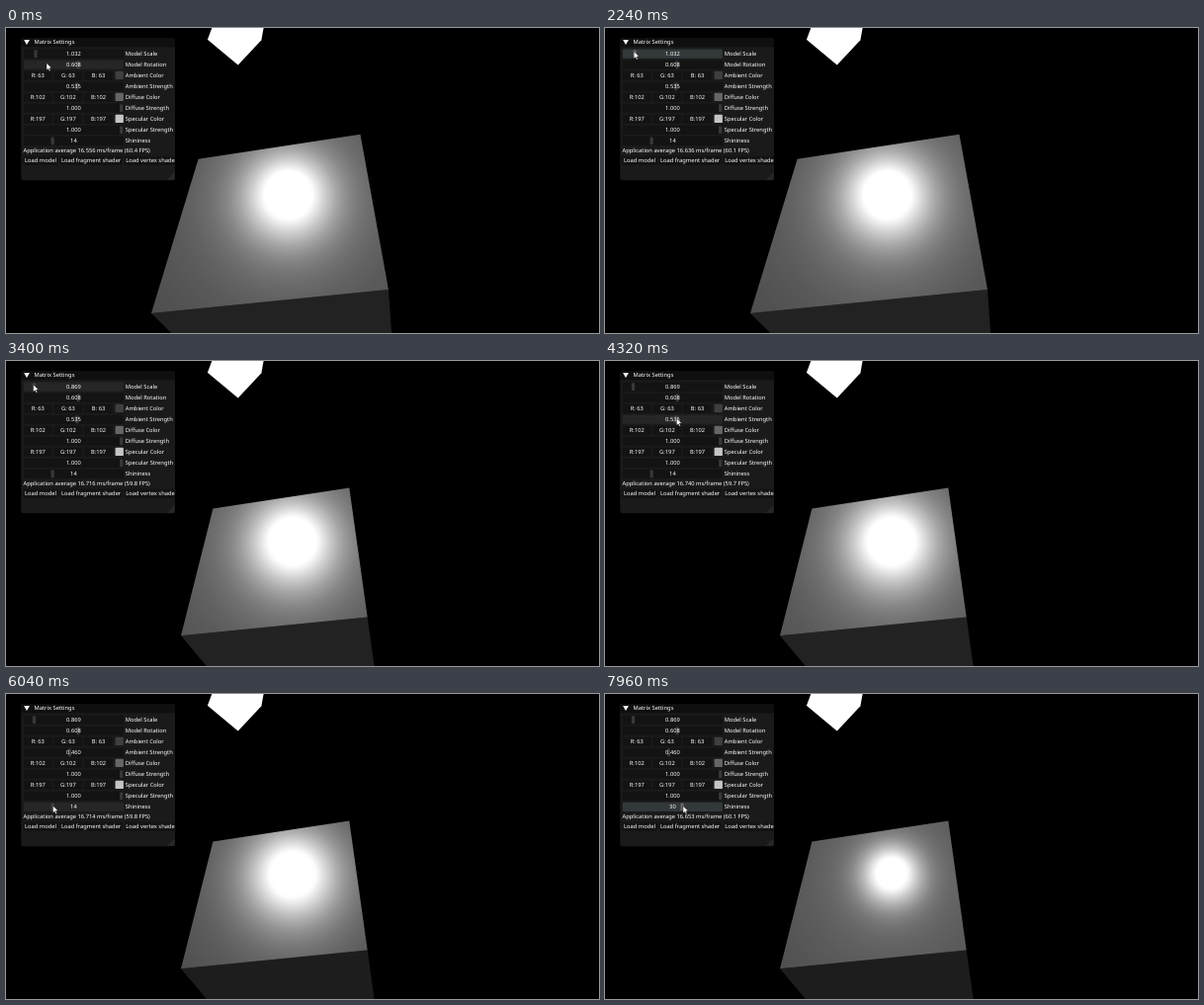
Recreate the animation shown at these times as an HTML page with a canvas. Size 600 by 309 pixels, loop 8 s.

```html
<!DOCTYPE html>
<html lang="en">
<head>
<meta charset="utf-8">
<title>Matrix Settings</title>
<style>
  html, body { margin: 0; width: 100%; height: 100%; overflow: hidden; background: #000; }
  canvas { display: block; width: 600px; height: 309px; }
</style>
</head>
<body>
<canvas id="stage" width="600" height="309"></canvas>
<script>
const ctx = document.getElementById('stage').getContext('2d');
const LOOP = 8000, STEP = 40;

const WHITE = '#fff';
const ROW_FILL = { idle: '#131313', hover: '#262626', active: '#33383b' };
const LEFT = 17.9, WIDTH = 101, ROW_TOP = 21.6, PITCH = 11.03, ROW_H = 9.1, GAP = 1.9;
const TRAVEL = 96.6;     // distance a slider grab can move
const UI_PIXEL = 0.3155; // one pixel of the panel, which is shown reduced

// Eased pointer moves: from, to, x, y
const HOME = [41, 35.5];
const MOVES = [
  [160, 760, 57, 55.5],
  [1040, 1640, 29.2, 23.8],
  [2260, 2820, 27.65, 24],
  [3480, 4200, 72.4, 58],
  [4600, 5200, 65, 58.5],
  [5560, 6060, 47.4, 113.5],
  [6760, 6900, 42, 113.5],
  [7000, 7760, 79, 113.5]
];

// Sliders follow the pointer while it is held down
const DRAGS = {
  scale: { row: 0, from: 1660, to: 3080, start: 1.032, range: 10 },
  ambient: { row: 3, from: 4480, to: 5500, start: 0.535, range: 1 },
  shininess: { row: 8, from: 6560, to: LOOP, start: 14, range: 50 }
};

const FRAME_MS = [[0, 16.556], [880, 16.703], [2240, 16.636], [3400, 16.716],
                  [5360, 16.767], [6920, 16.646], [7960, 16.6526]];

const mix = (a, b, u) => a + (b - a) * u;
const clamp01 = u => Math.min(1, Math.max(0, u));
const ease = u => u * u * (3 - 2 * u);
const gray = v => `rgb(${v},${v},${v})`;

function pointerAt(t) {
  return MOVES.reduce(([x, y], [from, to, endX, endY]) => {
    const u = ease(clamp01((t - from) / (to - from)));
    return [mix(x, endX, u), mix(y, endY, u)];
  }, HOME);
}

function dragValue({ from, to, start, range }, t) {
  const held = Math.min(to, Math.max(from, t));
  const dx = pointerAt(held)[0] - pointerAt(from)[0];
  return start + Math.round(dx / UI_PIXEL) * UI_PIXEL * range / TRAVEL;
}

function frameMsAt(t) {
  const next = FRAME_MS.findIndex(([time], i) => i > 0 && time >= t);
  const [[t0, a], [t1, b]] = [FRAME_MS[next - 1], FRAME_MS[next]];
  return mix(a, b, (t - t0) / (t1 - t0));
}

function polygon(points, fill) {
  ctx.beginPath();
  points.forEach(([x, y]) => ctx.lineTo(x, y));
  ctx.closePath();
  ctx.fillStyle = fill;
  ctx.fill();
}

function box(x, y, w, h, fill, radius = 0.95) {
  ctx.beginPath();
  ctx.roundRect(x, y, w, h, radius);
  ctx.fillStyle = fill;
  ctx.fill();
}

function text(str, x, middle, align = 'left') {
  ctx.textAlign = align;
  ctx.fillStyle = WHITE;
  ctx.fillText(str, x, middle + 2.1);
}

// Lit face brightness at distance r from the highlight: ambient + diffuse + specular
function shade(r, { ambient, shininess }) {
  const cosine = distance => 1 / Math.hypot(1, r / distance);
  const level = 63 * ambient + 79 * cosine(115) + 197 * cosine(114) ** shininess;
  return Math.min(255, Math.round(level));
}

function drawScene(state) {
  polygon([[208.7, -1], [203.9, 11.8], [234.8, 37.6], [258.4, 12.2], [260.8, -1]], WHITE);

  const u = (1.032 - state.scale) / 0.161;
  const at = (x0, y0, x1, y1) => [mix(x0, x1, u), mix(y0, y1, u)];
  const backLeft = at(194.6, 132.8, 209.2, 149.3), backRight = at(358.5, 107.7, 347.5, 128.3);
  const nearLeft = at(147, 289, 176.6, 278.5), nearRight = at(387, 265, 366, 259.5);
  const footLeft = at(168.2, 310, 203.2, 310), footRight = at(390.2, 310, 373, 310);
  polygon([nearLeft, nearRight, footRight, footLeft], gray(63 * state.ambient));

  const [x, y] = at(285.7, 166.8, 289.8, 180);
  const reach = 240, stops = 80;
  const glow = ctx.createRadialGradient(x, y, 0, x, y + 24, reach);
  for (let i = 0; i <= stops; i++) {
    glow.addColorStop(i / stops, gray(shade(i / stops * reach, state)));
  }
  polygon([backLeft, backRight, nearRight, nearLeft], glow);
}

function drawSlider(y, label, fraction, mode) {
  box(LEFT, y, WIDTH, ROW_H, ROW_FILL[mode]);
  const center = LEFT + 2.2 + fraction * TRAVEL;
  const grab = mode === 'active' ? 'rgba(143,143,143,.54)' : 'rgba(87,87,87,.54)';
  box(center - 1.6, y + 0.6, 3.2, ROW_H - 1.2, grab);
  text(label, LEFT + WIDTH / 2, y + ROW_H / 2, 'center');
}

function drawColor(y, level, hovered, pointerX) {
  const w = (WIDTH - ROW_H - 3 * GAP) / 3;
  ['R', 'G', 'B'].forEach((channel, i) => {
    const x = LEFT + i * (w + GAP);
    const over = hovered && pointerX >= x && pointerX < x + w;
    box(x, y, w, ROW_H, ROW_FILL[over ? 'hover' : 'idle']);
    text(`${channel}:${String(level).padStart(3)}`, x + w / 2, y + ROW_H / 2, 'center');
  });
  const swatch = ROW_H - 0.8;
  box(LEFT + WIDTH - swatch, y, swatch, swatch, gray(level));
}

function drawPanel(state) {
  const { pointer, pressed } = state;
  ctx.save();
  ctx.beginPath();
  ctx.roundRect(15.3, 10, 155.7, 144.3, 2.2);
  ctx.fillStyle = '#1a1a1a';
  ctx.fill();
  ctx.clip();
  box(15.3, 10, 155.7, 9.2, '#0f0f0f', 0);
  polygon([[18.2, 12], [23.9, 12], [21, 17]], WHITE);
  text('Matrix Settings', 28.6, 14.2);

  const rows = [
    ['Model Scale', state.scale.toFixed(3), state.scale / 10],
    ['Model Rotation', '0.608', 0.5 + 0.608 / (4 * Math.PI)],
    ['Ambient Color', 63],
    ['Ambient Strength', state.ambient.toFixed(3), state.ambient],
    ['Diffuse Color', 102],
    ['Diffuse Strength', '1.000', 1],
    ['Specular Color', 197],
    ['Specular Strength', '1.000', 1],
    ['Shininess', String(state.shininess), state.shininess / 50]
  ];
  rows.forEach(([name, value, fraction], i) => {
    const y = ROW_TOP + i * PITCH;
    const hovered = pressed < 0 && pointer[1] >= y && pointer[1] < y + ROW_H;
    if (fraction === undefined) drawColor(y, value, hovered, pointer[0]);
    else drawSlider(y, value, fraction, pressed === i ? 'active' : hovered ? 'hover' : 'idle');
    text(name, LEFT + WIDTH + GAP, y + ROW_H / 2);
  });

  const ms = state.frameMs;
  text(`Application average ${ms.toFixed(3)} ms/frame (${(1000 / ms).toFixed(1)} FPS)`, LEFT - 0.3, 123.8);

  let x = LEFT - 0.4;
  for (const name of ['Load model', 'Load fragment shader', 'Load vertex shader']) {
    const w = ctx.measureText(name).width + 3.2;
    box(x, 129.8, w, ROW_H, ROW_FILL.idle);
    text(name, x + 1.6, 134.3);
    x += w + GAP;
  }
  polygon([[170.7, 146], [170.7, 154], [162.7, 154]], '#272727');
  ctx.restore();
}

function drawPointer([x, y]) {
  const outline = [[0, 0], [0, 7.2], [1.7, 5.7], [2.9, 8.3], [4.1, 7.8], [2.9, 5.2], [5.2, 5]];
  polygon(outline.map(([dx, dy]) => [x + dx, y + dy]), WHITE);
  ctx.strokeStyle = '#000';
  ctx.lineWidth = 0.4;
  ctx.stroke();
}

function stateAt(t) {
  const press = Object.values(DRAGS).find(({ from, to }) => t >= from && t < to);
  return {
    pointer: pointerAt(t),
    pressed: press ? press.row : -1,
    scale: dragValue(DRAGS.scale, t),
    ambient: dragValue(DRAGS.ambient, t),
    shininess: Math.round(dragValue(DRAGS.shininess, t)),
    frameMs: frameMsAt(t)
  };
}

const start = performance.now();
function draw(now) {
  const t = Math.floor((Math.max(0, now - start) % LOOP) / STEP) * STEP;
  const state = stateAt(t);
  ctx.fillStyle = '#000';
  ctx.fillRect(0, 0, 600, 309);
  ctx.font = '5.76px "Noto Sans", "Open Sans", sans-serif';
  ctx.textRendering = 'geometricPrecision';
  drawScene(state);
  drawPanel(state);
  drawPointer(state.pointer);
  requestAnimationFrame(draw);
}
draw(start);
</script>
</body>
</html>
```
